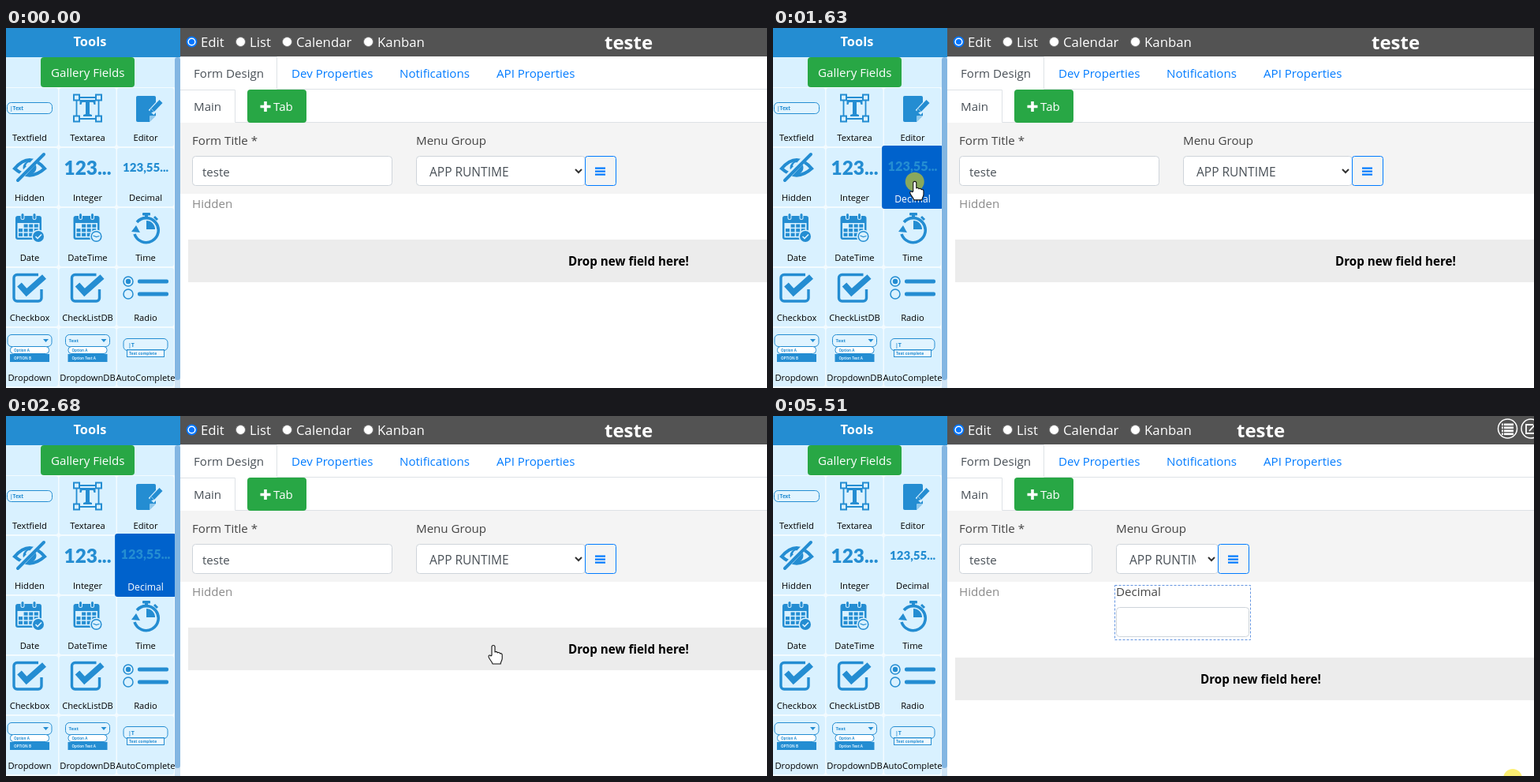
Recreate the animation shown at these times as an HTML page. Size 965x456 px, loop 5.64 s.

```html
<!DOCTYPE html>
<html lang="en">
<head>
<meta charset="utf-8">
<title>Form designer</title>
<style>
html, body { margin: 0; width: 100%; height: 100%; overflow: hidden; background: #fff; }
svg { display: block; width: 965px; height: 456px; }
text { font-family: "Open Sans", "Noto Sans", sans-serif; font-size: 15.1px; white-space: pre; }
.head { font-size: 16.8px; fill: #fff; }
.title { font-size: 24px; font-weight: 700; fill: #fff; }
.tile { font-size: 11.2px; text-anchor: middle; }
.tiny { font-size: 6px; font-weight: 700; }
.num { font-family: Lato, "Open Sans", sans-serif; font-weight: 900; text-anchor: middle; }
.bold { font-weight: 700; font-size: 15.2px; }
</style>
</head>
<body>
<svg id="stage" viewBox="0 0 965 456" xmlns="http://www.w3.org/2000/svg"></svg>
<script>
const LOOP = 5640, BLUE = '#248dd2', PALE = '#d9f1ff', LINK = '#007bff';
const INK = '#495057', LINE = '#ced4da', GREEN = '#28a745', PANEL = '#f4f4f4';

const rect = (x, y, w, h, fill, more = '') =>
  `<rect x="${x}" y="${y}" width="${w}" height="${h}" fill="${fill}" ${more}/>`;
const box = (x, y, w, h, stroke = LINE, more = 'rx="4"', fill = '#fff') =>
  rect(x + .5, y + .5, w - 1, h - 1, fill, `stroke="${stroke}" ${more}`);
const text = (x, y, s, fill = INK, more = '') => `<text x="${x}" y="${y}" fill="${fill}" ${more}>${s}</text>`;
const line = (d, stroke, w = 1, more = '') =>
  `<path d="${d}" fill="none" stroke="${stroke}" stroke-width="${w}" ${more}/>`;
const shape = (d, fill, more = '') => `<path d="${d}" fill="${fill}" ${more}/>`;
const dot = (x, y, r, fill, more = '') => `<circle cx="${x}" cy="${y}" r="${r}" fill="${fill}" ${more}/>`;
const group = (id, body, more = '') => `<g id="${id}" ${more}>${body}</g>`;
const ring = w => `stroke="${BLUE}" stroke-width="${w}"`;
const tiny = (x, y, s, fill = BLUE, size = 6) => text(x, y, s, fill, `class="tiny" style="font-size:${size}px"`);
const num = (y, s, size) => text(0, y, s, BLUE, `class="num" style="font-size:${size}px"`);

// Icons: x from the tile's centre, y from its top.
function calendar(badge) {
  let s = rect(-18, 10, 33, 30, BLUE, 'rx="3"') + rect(-15.5, 19, 28, 18.5, PALE);
  for (const x of [-9, 6]) s += rect(x - 2.5, 6, 5, 9, PALE, 'rx="2.5"') + rect(x - 1.5, 7, 3, 7, BLUE, 'rx="1.5"');
  for (let i = 1; i < 12; i++) s += rect(-14 + i % 4 * 6.6, 20.5 + (i / 4 | 0) * 5.6, 5, 4.2, BLUE);
  return s + dot(11, 36, 8.5, PALE) + badge;
}
const checkbox = line('M11 8.5H-16a4 4 0 0 0-4 4V38a4 4 0 0 0 4 4H11a4 4 0 0 0 4-4V27', BLUE, 3.4) +
  line('M-13 21L-4 31 18.5 11', BLUE, 7.5);
const dropdown = s => box(-28.5, 8, 57, 16, BLUE, 'rx="5" fill-opacity=".2"') +
  shape('M17 14h7l-3.5 4z', BLUE) + box(-25, 23, 50, 10, BLUE) + rect(-25, 33, 50, 10, BLUE) +
  tiny(-20, 30, 'Option A', BLUE, 4.5) + tiny(-20, 39.5, s ? 'Option Text A' : 'OPTION B', PALE, 4.5) + (s ? tiny(-24, 18, s) : '');
const corners = [-18, 10].flatMap(x => [8, 35].map(y => box(x, y, 8, 8, BLUE, 'stroke-width="2"', PALE))).join('');

const tiles = [
  ['Textfield', box(-29, 18, 58, 15, BLUE, 'rx="5" fill-opacity=".2"') + tiny(-25, 28, '|Text', BLUE, 6.5)],
  ['Textarea', line('M-14 12H14V39H-14Z', BLUE, 1.8) + corners +
    shape('M-10 15H10V21H8L7 18H2.5V33L5.5 34V36H-5.5V34L-2.5 33V18H-7L-8 21H-10Z', BLUE)],
  ['Editor', shape('M-12 12a2 2 0 0 1 2-2H11a2 2 0 0 1 2 2V35L5 43H-10a2 2 0 0 1-2-2Z', BLUE) +
    shape('M5 43V36a1 1 0 0 1 1-1H13Z', PALE, 'opacity=".6"') +
    line('M20 17L7 31', PALE, 9) + line('M19.5 17L9 28', BLUE, 5.5) + shape('M6.5 26L10.5 30 4 32.5Z', BLUE)],
  ['Hidden', line('M-19 26Q0 4 19 26Q0 43-19 26Z', BLUE, 4.2) + dot(0, 25, 8.5, BLUE) +
    line('M-4 23a5 5 0 0 1 4-4', PALE, 2) + line('M-16 41L16 7', PALE, 7) + line('M-15 41L18 8', BLUE, 4, 'stroke-linecap="round"')],
  ['Integer', num(34, '123...', 24.4)],
  ['Decimal', num(30, '123,55...', 15.1)],
  ['Date', calendar(dot(11, 36, 7, BLUE) + line('M7.5 36l2.5 2.5 5-5', PALE, 1.6))],
  ['DateTime', calendar(dot(11, 36, 6.3, PALE, ring(1.5)) + line('M7 35l4 1.5 4-1', BLUE, 1.2))],
  ['Time', line('M-11 18A15.5 15.5 0 1 1-14 33', BLUE, 3.6) + shape('M-18 30L-12 22-7 31Z', BLUE) +
    shape('M1 27V16A11 11 0 0 1 12 27Z', BLUE) + rect(-4, 6, 10, 3.5, BLUE, 'rx="1"') + rect(-1, 8, 4, 5, BLUE) +
    line('M11 11l4 4', BLUE, 3)],
  ['Checkbox', checkbox],
  ['CheckListDB', checkbox],
  ['Radio', dot(-22, 17, 6, PALE, ring(1.5)) + dot(-22, 17, 3.2, BLUE) + dot(-22, 33, 6, PALE, ring(1.5)) +
    rect(-10, 14.5, 39, 5, BLUE, 'rx="2"') + rect(-10, 30.5, 39, 5, BLUE, 'rx="2"')],
  ['Dropdown', dropdown('')],
  ['DropdownDB', dropdown('Text')],
  ['AutoComplete', box(-28.5, 13, 57, 16, BLUE, 'rx="5" fill-opacity=".2"') + tiny(-22, 24, '|T', BLUE, 7) +
    box(-24, 27, 48, 10, BLUE, 'fill-opacity=".6"') + tiny(-21, 34, 'Text complete', BLUE, 5)]
];
const tileAt = i => [30 + i % 3 * 73.5, 76 + (i / 3 | 0) * 76];
const tileBody = ([name, icon], bg = PALE, ink = '#000') =>
  rect(-36, 0, 72, 74, bg, 'rx="3"') + icon + text(0, 67, name, ink, 'class="tile"');
const tile = i => group(tiles[i][0], tileBody(tiles[i]), `transform="translate(${tileAt(i)})"`);

const radio = (x, s, on) => dot(x, 17.5, 6, '#fff', `stroke="${on ? '#0075ff' : '#767676'}" stroke-width="${on ? 1.8 : 1}"`) +
  (on ? dot(x, 17.5, 3.6, '#0075ff') : '') + text(x + 11.5, 24, s, '#fff', 'class="head"');

// Form row for a given column width
function form(id, w) {
  const x = 266 + w, b = x + w - 40;
  return group(id, text(x, 148, 'Menu Group', '#444') + box(236, 162, w, 38) + text(249, 188, 'teste') +
    box(x, 162, w - 39, 38) +
    `<clipPath id="${id}Clip"><path d="M${x} 162H${b - 28}V200H${x}Z"/></clipPath>` +
    text(x + 17, 188, 'APP RUNTIME', INK, `style="font-size:15.5px" clip-path="url(#${id}Clip)"`) +
    line(`M${b - 12} 179l4 4 4-4`, '#333', 2) +
    box(b, 162, 40, 38, LINK, 'rx="3"', PANEL) +
    [177, 181, 185].map(y => rect(b + 13, y - .5, 13, 2.2, LINK)).join(''));
}

const header = rect(221, 0, 744, 36, '#535353') + radio(235.5, 'Edit', true) + radio(297.5, 'List') +
  radio(356.5, 'Calendar') + radio(459.5, 'Kanban') + text(759, 27, 'teste', '#fff', 'id="title" class="title"') +
  group('tools', dot(931.5, 16, 12, 'none', 'stroke="#fff" stroke-width="1.5"') +
    [10, 14, 18, 22].map(y => rect(924, y - .5, 2, 2.6, '#fff') + rect(927, y - .5, 12, 2.6, '#fff')).join('') +
    dot(961, 16, 12, 'none', 'stroke="#fff" stroke-width="1.5"') +
    line('M964 11H955V22H966M959 19L968 9', '#fff', 1.8));

const tabs = line('M221 36.5H343.5V77.5H965', '#dee2e6') + line('M221 78.5H290.5V119.5H965', '#dee2e6') +
  text(238, 63, 'Form Design') + text(362, 63, 'Dev Properties', LINK) + text(499, 63, 'Notifications', LINK) +
  text(622, 63, 'API Properties', LINK) + text(238, 105, 'Main') +
  rect(306, 78, 75, 42, GREEN, 'rx="4"') + line('M329 93v13M322.5 99.5h13', '#fff', 3.6) + text(339, 105, 'Tab', '#fff');

const dashed = (y, h, stroke) =>
  rect(433.5, y, 172, h, 'none', `stroke="${stroke}" stroke-dasharray="3 2"`);
const editing = group('editing', box(435, 210, 169, 62) +
  group('focus', rect(434.5, 210.5, 170, 62, '#fff', 'rx="4" stroke="#bfdeff" stroke-width="4"') + box(435, 210, 170, 62, '#80bdff')) +
  line('M596 270l7-7M600 270l3-3', '#555') + text(448, 235, 'Decimal', INK, 'class="bold"') +
  rect(508, 221, 1.2, 18, '#222', 'id="caret"') + box(435, 278, 169, 38) + dashed(210.5, 109, '#6f87a5'));
const done = group('done', text(435, 228, 'Decimal', '#444') + box(435, 242, 169, 38) + dashed(214.5, 69, '#6495e0'));

const main = header + tabs + rect(221, 120, 744, 90, PANEL) + text(236, 148, 'Form Title *', '#444') +
  form('wide', 254) + form('narrow', 169) + text(236, 228, 'Hidden', '#8a8a8a') + editing + done +
  group('strip', rect(231, 0, 734, 54, '#ececec') + text(713, 33, 'Drop new field here!', '#000', 'id="drop" class="bold"'));

const side = rect(0, 37, 214, 419, '#f3fbff') + rect(0, 37, 214, 38, PALE) +
  tiles.map((_, i) => i === 5 || i === 8 ? '' : tile(i)).join('') + tile(8) + tile(5);

const hand = 'M-2 12V1.5a2 2 0 0 1 4 0V8a2 2 0 0 1 3.2.9 2 2 0 0 1 3.2 1 1.9 1.9 0 0 1 2.8 1.7V16c0 3-2 4-2 7H-1c-.5-3-4.5-6-5-9-.3-2 1.8-2.8 2.8-1z';
const arrow = 'M0 0V16.5L4 12.8 6.6 19 9.2 17.9 6.6 12H12Z';
const pen = 'stroke="#111" stroke-width="1.1" stroke-linejoin="round"';

document.getElementById('stage').innerHTML =
  '<clipPath id="sideClip"><path d="M0 37H214V456H0Z"/></clipPath>' + rect(0, 0, 965, 456, '#fff') + main +
  `<g clip-path="url(#sideClip)">${side}</g>` + rect(214, 37, 7, 419, '#cfe4f5') +
  rect(214, 37, 7, 409, '#83b6e2', 'rx="3.5"') + rect(0, 0, 221, 37, BLUE) +
  text(85.5, 23, 'Tools', '#fff', 'style="font-weight:700;font-size:16.4px"') +
  rect(44, 37, 119, 38, GREEN, 'rx="4"') + text(57, 62, 'Gallery Fields', '#fff') +
  group('ghost', tileBody(tiles[5], '#0062cc', '#fff'), 'opacity=".75"') +
  group('pointer', dot(0, 0, 12, '#fae100', 'id="press" opacity=".55"') + shape(hand, '#fff', `id="hand" ${pen}`) +
    shape(arrow, '#fff', `id="arrow" ${pen}`) +
    group('copy', line('M5 15l6 5M4 18l6 4M8 14l5 4', '#222', 1.5, 'stroke-dasharray="1 1"') +
      box(10, 19, 11, 11, '#111', '') + line('M15.5 21.5v6M12.5 24.5h6', '#111', 1.2)));

const $ = id => document.getElementById(id);
const show = (id, on) => $(id).setAttribute('display', on ? 'inline' : 'none');
const move = (id, x, y) => $(id).setAttribute('transform', `translate(${x} ${y})`);
const clamp = v => Math.min(1, Math.max(0, v));
const mix = (a, b, k) => `rgb(${a.map((v, i) => Math.round(v + (b[i] - v) * k))})`;

// Pointer path: time, x, y
const path = [
  [330, 609, 413], [470, 500, 366], [600, 370, 322], [740, 245, 284], [880, 184, 264], [1020, 178, 248],
  [1160, 169, 218], [1480, 171, 190], [1550, 171, 190], [1620, 180, 195], [1690, 260, 235], [1750, 340, 275],
  [1820, 420, 292], [1880, 487, 301], [1940, 517, 308], [2010, 560, 311], [2080, 591, 311], [2160, 609, 299],
  [2296, 618, 291], [4749, 618, 291], [4750, 626, 298], [4890, 680, 328], [5100, 820, 400], [5310, 909, 446], [5380, 938, 459]
];
function at(t) {
  const i = path.findIndex(p => p[0] >= t);
  if (i < 0) return path[path.length - 1].slice(1);
  if (!i) return path[0].slice(1);
  const [a, b] = [path[i - 1], path[i]], k = (t - a[0]) / (b[0] - a[0]);
  return [a[1] + (b[1] - a[1]) * k, a[2] + (b[2] - a[2]) * k];
}

const starts = [0, 330, 950, 1160, 1550, 1940, 2160, 2680, 2870, 4750, 5380, 5510];
function step(t) {
  const s = starts.filter(v => v <= t).pop();
  return s + Math.floor((t - s) / 68) * 68;
}

const pale = [217, 241, 255], hover = [153, 204, 255], dark = [0, 98, 204];
function paint(name, i, big, bg, white) {
  const g = $(name), [x, y] = tileAt(i);
  g.setAttribute('transform', `translate(${x} ${y})` + (big ? ' translate(0 37) scale(1.08) translate(0 -37)' : ''));
  g.firstChild.setAttribute('fill', bg);
  g.lastChild.setAttribute('fill', mix([0, 0, 0], [255, 255, 255], white));
}

function draw(now) {
  const t = step(now), grown = t >= 2870, ended = t >= 5510;

  show('wide', !grown);
  show('narrow', grown);
  show('tools', grown);
  $('title').setAttribute('x', grown ? 588 : 759);
  $('drop').setAttribute('x', grown ? 542 : 713);
  const top = ended ? 306 : grown ? 342 : 268;
  move('strip', 0, top);
  show('editing', grown && !ended);
  show('done', ended);
  $('focus').setAttribute('opacity', clamp((t - 2870) / 136));
  show('caret', t >= 2938);

  const over = t >= 1160 ? 1 - clamp((t - 1160) / 150) : clamp((t - 800) / 80);
  paint('Time', 8, t >= 800 && t < 1160, mix(pale, hover, over), over);
  const lit = clamp((t - 1160) / 150), out = clamp((t - 4820) / 150);
  const bg = t < 1550 ? mix(pale, hover, lit) : mix(dark, pale, out);
  paint('Decimal', 5, t >= 1160 && t < 4750, bg, t < 1550 ? lit : 1 - out);

  const [x, y] = at(t), drag = t >= 1686 && t < 2680;
  show('pointer', t >= 330);
  move('pointer', x, y);
  const stale = t >= 2680 && t < 4750;
  const link = !drag && (stale || x < 214 || y > top && y < top + 54);
  show('hand', link);
  show('arrow', !link);
  show('copy', drag);
  show('press', t >= 1550 && t < 2680 || t >= 5380);
  const [gx, gy] = at(t - 60);
  show('ghost', drag);
  move('ghost', gx + 5, gy - 40);
}

const t0 = performance.now();
function tick() {
  draw((performance.now() - t0) % LOOP);
  requestAnimationFrame(tick);
}
tick();
</script>
</body>
</html>
```
